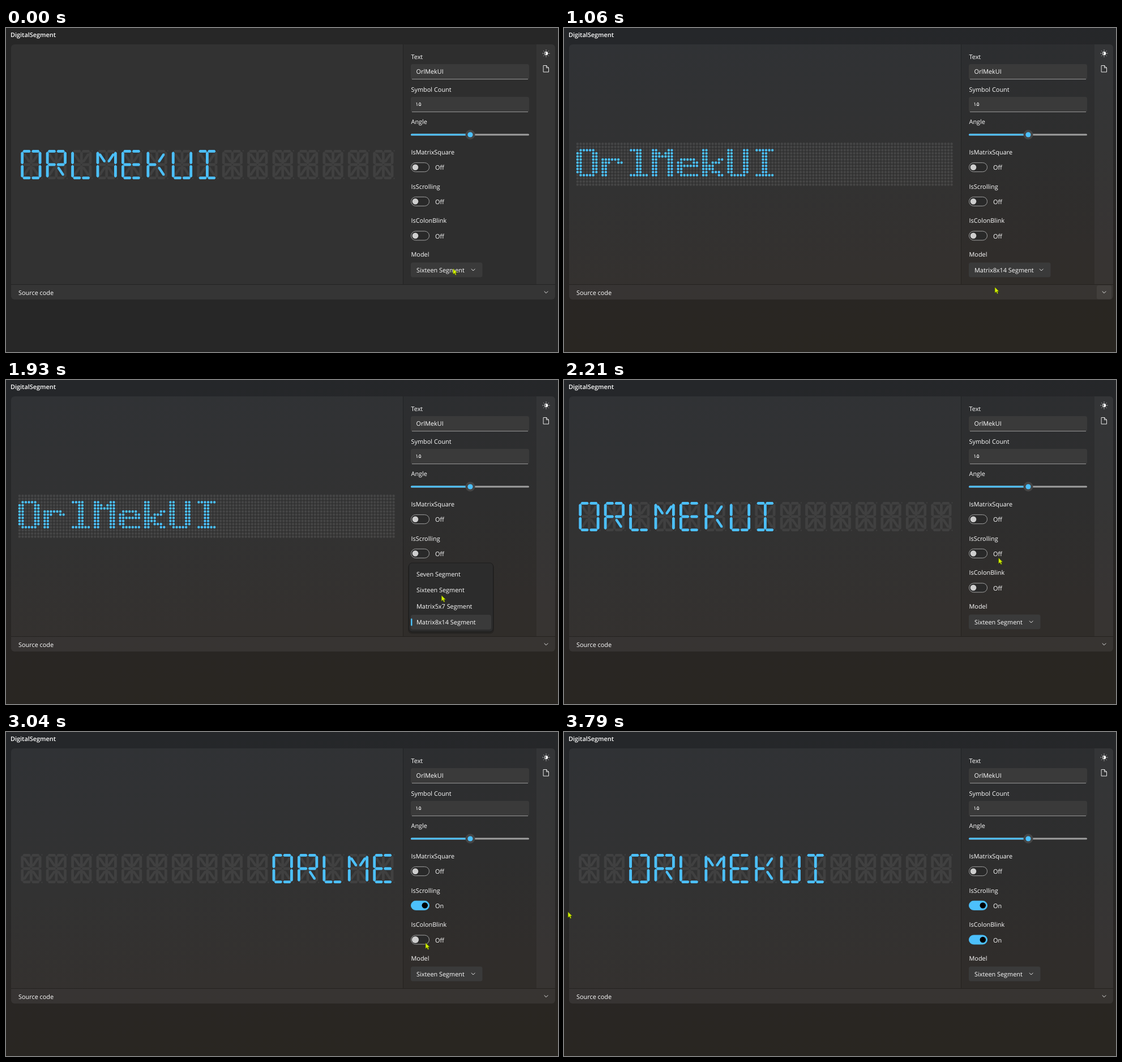
Animation of 975x574 px, one loop 3.86 s. Source, as an HTML page:

```html
<!DOCTYPE html>
<html lang="en">
<head>
<meta charset="utf-8">
<title>DigitalSegment</title>
<style>
  html, body { margin: 0; height: 100%; overflow: hidden; background: #272727; }
  svg { display: block; }
  text { font: 10.9px "Open Sans", "DejaVu Sans", sans-serif; fill: #fff; white-space: pre; text-rendering: geometricPrecision; }
  .title { font-weight: 600; }
  .digits { font-size: 9.6px; }
  .line { fill: none; stroke: #e8e8e8; stroke-linecap: round; stroke-linejoin: round; }
  .lit { fill: #4cc0fc; }
</style>
</head>
<body>
<svg width="975" height="574" viewBox="0 0 975 574">
  <defs>
    <linearGradient id="tint" x1="0.35" y1="0" x2="0.5" y2="1">
      <stop offset="0" stop-color="#25272a"/>
      <stop offset=".45" stop-color="#272727"/>
      <stop offset=".75" stop-color="#292624"/>
      <stop offset="1" stop-color="#292621"/>
    </linearGradient>
    <clipPath id="card"><rect x="9" y="29" width="961" height="452" rx="6"/></clipPath>
  </defs>
  <rect width="975" height="574" fill="#272727"/>
  <rect id="backdrop" width="975" height="574" fill="url(#tint)"/>
  <text class="title" x="8" y="15.5">DigitalSegment</text>

  <g clip-path="url(#card)" fill="#fff">
    <rect x="9" y="29" width="692" height="425" opacity=".052"/>
    <rect x="702" y="29" width="235" height="425" opacity=".033"/>
    <rect x="937" y="29" width="33" height="425" opacity=".067"/>
    <rect x="9" y="455" width="961" height="26" opacity=".067"/>
    <path d="M701 29h1v425h-1zM9 454h961v1H9z" fill="#000" opacity=".1"/>
    <rect id="hover" x="941" y="456" width="26" height="24.5" rx="3" opacity=".055"/>
  </g>
  <text x="22" y="472.7">Source code</text>
  <path class="line" d="M951 466.7l3 3 3-3"/>

  <g class="line">
    <circle cx="954" cy="45" r="3"/>
    <path d="M954 42a3 3 0 0 1 0 6z" fill="#fff"/>
    <path id="rays"/>
    <path d="M949.5 66.5h5l4 4v7.5h-9zM954.5 66.5v4h4"/>
  </g>

  <path id="dim" fill="#fff"/>
  <path id="lit" class="lit"/>

  <g id="options">
    <text x="715.5" y="55">Text</text>
    <text x="715.5" y="112.7">Symbol Count</text>
    <text x="715.5" y="170">Angle</text>
    <g fill="#3a3a3a">
      <rect x="715" y="64" width="209" height="27" rx="3.5"/>
      <rect x="715" y="122" width="209" height="27" rx="3.5"/>
    </g>
    <path d="M717 90.6h205M717 148.6h205" stroke="#9a9a9a"/>
    <text x="724.5" y="81">OrlMekUI</text>
    <text class="digits" x="723.3" y="138.2">۱۵</text>
    <rect x="715" y="187.5" width="209" height="3" rx="1.5" fill="#9f9f9f"/>
    <rect x="715" y="187.5" width="105" height="3" rx="1.5" class="lit"/>
    <circle cx="820" cy="189" r="8.5" fill="#454545"/>
    <circle cx="820" cy="189" r="4.6" class="lit"/>
    <text x="715.5" y="405">Model</text>
    <rect id="button" x="715" y="415.5" height="26" rx="3.5" fill="#3a3a3a"/>
    <text id="choice" x="725" y="433"></text>
    <path id="chevron" class="line" d="M-3 -1.5l3 3 3-3"/>
  </g>

  <g id="menu">
    <rect x="710" y="-18" width="152" height="124" rx="7" fill="#000" opacity=".2"/>
    <rect x="711.5" y="-19.5" width="149" height="122" rx="6" fill="#2c2c2c" stroke="#1d1d1d"/>
    <g id="mark">
      <rect x="715" y="-13" width="142" height="26" rx="3.5" fill="#3a3a3a"/>
      <rect x="715" y="-6.5" width="2.5" height="13" rx="1.2" class="lit"/>
    </g>
  </g>
  <path id="cursor" d="M0 0V10.5L2.5 8.3 4.2 12 6 11.2 4.4 7.6H7.5Z" fill="#d2f000" stroke="#3c4a08" stroke-width=".6"/>
</svg>
<script>
const $ = id => document.getElementById(id);
const set = (el, attrs) => { for (const k in attrs) el.setAttribute(k, attrs[k]); return el; };
const add = (parent, tag, attrs) =>
  parent.appendChild(set(document.createElementNS('http://www.w3.org/2000/svg', tag), attrs));
const clamp = v => Math.max(0, Math.min(1, v));
const ramp = (t, start, length) => clamp((t - start) / length);

const LOOP = 3860, SLOTS = 15, ITEM = 28.5;
const MODELS = ['Seven Segment', 'Sixteen Segment', 'Matrix5x7 Segment', 'Matrix8x14 Segment'];
const BUTTON_RIGHT = [830, 841.5, 854.5, 859.5];

// Sixteen segments: pairs of nodes on a 3x3 grid, numbered by row.
const SEGMENTS = '01 12 34 45 67 78 03 36 14 47 25 58 04 24 46 48';
const SIXTEEN = {
  O: '01 12 25 58 78 67 36 03', R: '01 12 25 34 45 36 03 48', L: '03 36 67 78',
  M: '03 36 25 58 04 24', E: '01 12 03 36 34 45 67 78', K: '03 36 34 24 48',
  U: '03 36 67 78 25 58', I: '01 12 14 47 67 78'
};
// Matrix letters: strokes through xy points, in hex.
const SMALL = {
  O: '10 30 41 45 36 16 05 01 10', R: '06 00 30 41 42 33 03/23 46', L: '00 06 46',
  M: '06 00 22 40 46', E: '40 00 06 46/03 33', K: '00 06/03 13 40/13 46',
  U: '00 05 16 36 45 40', I: '10 30/20 26/16 36'
};
const LARGE = {
  O: '12 42 53 59 4A 1A 09 03 12', r: '05 0A/07 25 45 56', l: '12 32 3A/1A 5A',
  M: '0A 02 24 34 52 5A', e: '07 57 56 45 15 06 09 1A 5A', k: '02 0A/08 55/28 5A',
  U: '02 09 1A 4A 59 52', I: '12 52/32 3A/1A 5A'
};
const WORD = 'OrlMekUI';

function segment(pair, left) {
  const [a, b] = [...pair].map(n => [left + 2.2 + n % 3 * 15.7, 218.4 + Math.floor(n / 3) * 23.6]);
  const dx = b[0] - a[0], dy = b[1] - a[1], len = Math.hypot(dx, dy);
  const slanted = dx && dy, ux = dx / len, uy = dy / len, half = slanted ? 2.2 : 2.4;
  const inset = slanted ? 4.6 : 0.6;
  const at = (along, side) =>
    `${(a[0] + ux * along - uy * side).toFixed(2)} ${(a[1] + uy * along + ux * side).toFixed(2)}`;
  const e = len - inset, c = 1.9;
  return `M${at(inset, 0)}L${at(inset + c, half)} ${at(e - c, half)} ${at(e, 0)} ${at(e - c, -half)} ${at(inset + c, -half)}z`;
}

function sixteen(first) {
  let dim = '', lit = '';
  for (let i = 0; i < SLOTS; i++) {
    const left = 26.5 + i * 44.43;
    dim += SEGMENTS.split(' ').map(p => segment(p, left)).join('');
    dim += `M${left + 36} 216.5h2v2h-2zM${left + 36} 265.5h2v2h-2z`;
    const letter = WORD[i - first];
    if (letter) lit += SIXTEEN[letter.toUpperCase()].split(' ').map(p => segment(p, left)).join('');
  }
  return [dim, lit];
}

function matrix({ cols, rows, pitch, x, y, size, brush, font, upper }, square) {
  const on = new Set();
  [...(upper ? WORD.toUpperCase() : WORD)].forEach((letter, i) => {
    for (const stroke of font[letter].split('/')) {
      const pts = stroke.split(' ').map(p => [...p].map(d => parseInt(d, 16)));
      for (let k = 1; k < pts.length; k++) {
        const [[x0, y0], [x1, y1]] = [pts[k - 1], pts[k]];
        const n = Math.max(Math.abs(x1 - x0), Math.abs(y1 - y0));
        for (let s = 0; s <= n; s++)
          for (let w = 0; w < brush; w++)
            on.add(`${i * cols + Math.round(x0 + (x1 - x0) * s / n) + w},${Math.round(y0 + (y1 - y0) * s / n)}`);
      }
    }
  });
  const paths = ['', ''];
  for (let r = 0; r < rows; r++)
    for (let c = 0; c < cols * SLOTS; c++) {
      const cx = (x + c * pitch).toFixed(2), cy = (y + r * pitch).toFixed(2), h = size / 2;
      paths[+on.has(`${c},${r}`)] += square
        ? `M${cx - h} ${cy - h}h${size}v${size}h${-size}z`
        : `M${cx - h} ${cy}a${h} ${h} 0 1 0 ${size} 0a${h} ${h} 0 1 0 ${-size} 0z`;
    }
  return paths;
}
const GRIDS = {
  2: { cols: 5, rows: 7, pitch: 8.9, x: 25, y: 215, size: 6.6, brush: 1, font: SMALL, upper: true },
  3: { cols: 8, rows: 14, pitch: 5.552, x: 23.9, y: 205.3, size: 4.5, brush: 2, font: LARGE }
};

// Pointer stops: time, x, y.
const STOPS = [
  [0, 789.5, 426], [140, 789.5, 426], [420, 765, 457], [560, 765, 457], [720, 785, 428],
  [820, 785, 428], [1000, 762, 458], [1120, 760, 460], [1390, 737, 249.5], [1670, 737, 249.5],
  [1820, 775, 428], [1970, 768, 372], [2210, 767.5, 315], [2400, 740, 312], [2690, 740, 312],
  [2960, 741, 373.5], [3440, 741, 373.5], [3790, 7, 318.5], [LOOP, 7, 318.5]
];
// Menu: opens, closes, selected item, picked item.
const PICKS = [[140, 490, 1, 2], [790, 1050, 2, 3], [1810, 2000, 3, 1]];

const toggles = [
  ['IsMatrixSquare', 246.7, 1400, 1650],
  ['IsScrolling', 307.3, 2420, Infinity],
  ['IsColonBlink', 368, 3180, Infinity]
].map(([name, y, on, off]) => {
  const options = $('options');
  add(options, 'text', { x: 715.5, y: y - 22.7 }).textContent = name;
  return {
    y, on, off,
    track: add(options, 'rect', { x: 715.5, y: y - 8, width: 32, height: 16, rx: 8 }),
    knob: add(options, 'circle', { cy: y }),
    label: add(options, 'text', { x: 758, y: y + 4.7 })
  };
});
MODELS.forEach((name, i) => add($('menu'), 'text', { x: 725, y: i * ITEM + 4 }).textContent = name);
$('rays').setAttribute('d', Array.from({ length: 8 }, (_, i) => {
  const c = Math.cos(i * Math.PI / 4), s = Math.sin(i * Math.PI / 4);
  return `M${954 + 5.5 * c} ${45 + 5.5 * s}L${954 + 6 * c} ${45 + 6 * s}`;
}).join(''));

function pointer(t) {
  const i = STOPS.findIndex(s => s[0] > t);
  const [t0, x0, y0] = STOPS[i - 1], [t1, x1, y1] = STOPS[i];
  const p = ramp(t, t0, t1 - t0), e = p * p * (3 - 2 * p);
  return [x0 + (x1 - x0) * e, y0 + (y1 - y0) * e];
}

let shown;
function showDisplay(model, square, first) {
  const key = [model, square, first].join();
  if (key === shown) return;
  shown = key;
  const [dim, lit] = GRIDS[model] ? matrix(GRIDS[model], square) : sixteen(first);
  set($('dim'), { d: dim, opacity: model === 1 ? 0.07 : 0.095 });
  set($('lit'), { d: lit });
  const right = BUTTON_RIGHT[model];
  set($('button'), { width: right - 715 });
  set($('chevron'), { transform: `translate(${right - 16.3} 428.5)` });
  $('choice').textContent = MODELS[model];
}

function draw() {
  const t = performance.now() % LOOP;
  const [x, y] = pointer(t);
  set($('cursor'), { transform: `translate(${x} ${y})` });
  set($('backdrop'), { opacity: ramp(t, 70, 70) });

  const open = PICKS.find(p => t >= p[0] && t < p[1]);
  const model = PICKS.reduce((m, p) => t >= p[1] ? p[3] : m, 1);
  set($('menu'), { opacity: open ? ramp(t, open[0], 70) : 0 });
  if (open) {
    set($('menu'), { transform: `translate(0 ${429 - open[2] * ITEM})` });
    set($('mark'), { transform: `translate(0 ${open[2] * ITEM})` });
  }
  $('hover').style.display = !open && y > 455 && y < 481 ? '' : 'none';

  for (const { y: cy, on, off, track, knob, label } of toggles) {
    const active = t >= on && t < off;
    const over = Math.abs(x - 732) < 17 && Math.abs(y - cy) < 9;
    const slide = ramp(t, on, 120) - ramp(t, off, 80);
    const blue = over ? '#49b1e7' : '#4cc0fc';
    set(track, { fill: active ? blue : '#292929', stroke: active ? blue : '#a0a0a0' });
    set(knob, { cx: 723 + 16.8 * slide, r: over ? 6.1 : 5.3, fill: active ? '#000' : '#cecece' });
    label.textContent = active ? 'On' : 'Off';
  }

  const first = t < toggles[1].on ? 0 : Math.min(SLOTS, Math.round(7 + (3320 - t) / 93.5));
  showDisplay(model, t >= toggles[0].on && t < toggles[0].off, first);
  requestAnimationFrame(draw);
}
draw();
</script>
</body>
</html>
```
